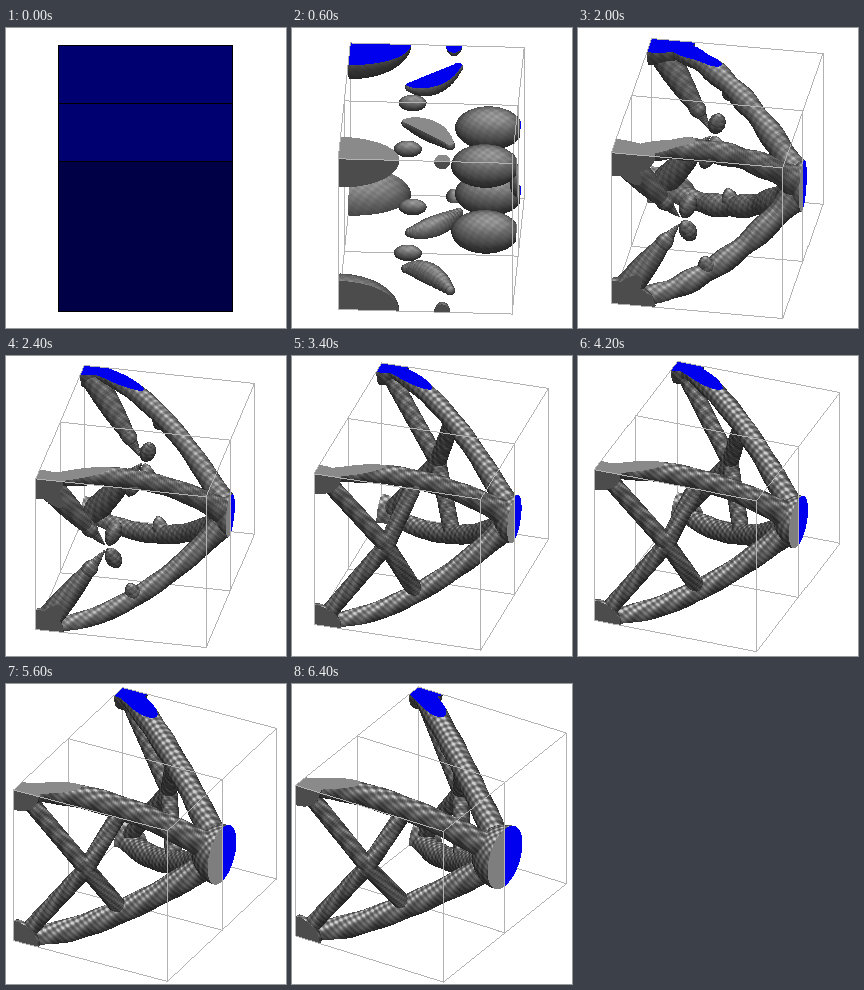
An HTML page with a canvas that plays this animation: 280 px wide and 300 px high, repeating every 6.6 s.

```html
<!DOCTYPE html>
<html lang="en">
<head>
<meta charset="utf-8">
<title>Bracket optimisation</title>
<style>
html, body { margin: 0; width: 100%; height: 100%; overflow: hidden; background: #fff; }
canvas { display: block; width: 280px; height: 300px; }
</style>
</head>
<body>
<canvas id="stage" width="280" height="300"></canvas>
<script>
const W = 280, H = 300, CX = 138.7, CY = 150, STEP = 200, STEPS = 33;
const ctx = document.getElementById('stage').getContext('2d');
const img = ctx.createImageData(W, H), px = img.data;
const zbuf = new Float32Array(W * H), enter = new Float32Array(W * H), leave = new Float32Array(W * H);
const side = new Uint8Array(W * H);

// Half sizes of the box; x runs along the beam, y up, z towards the viewer.
const BX = 87, BY = 87, BZ = 116, LEN = 2 * BX;

let step = -1, right, up, view, grain;

const dot = (a, b) => a[0] * b[0] + a[1] * b[1] + a[2] * b[2];
const mix = (a, b, t) => a + (b - a) * t;
const mixPoint = (a, b, t) => a.map((v, i) => mix(v, b[i], t));
const clamp = t => Math.min(1, Math.max(0, t));
function smooth(from, to, v) {
  const t = clamp((v - from) / (to - from));
  return t * t * (3 - 2 * t);
}

// The view turns one degree per step, seen from 30 degrees above.
function aim(deg) {
  const a = deg * Math.PI / 180, s = Math.sin(a), c = Math.cos(a), k = Math.sqrt(3) / 2;
  right = [c, 0, -s];
  up = [-s / 2, k, -c / 2];
  view = [s * k, .5, c * k];
}

function project(p) {
  const q = [p[0] - BX, p[1], p[2]];
  return [CX + dot(q, right), CY - dot(q, up), dot(q, view)];
}

const rayStart = (x, y, i) => (x - CX) * right[i] + (CY - y) * up[i];

// Where each pixel's ray enters and leaves the box, and through which face.
function clipBox() {
  const half = [BX, BY, BZ];
  for (let y = 0, n = 0; y < H; y++) for (let x = 0; x < W; x++, n++) {
    let near = 1e6, far = -1e6, face = 0;
    for (let i = 0; i < 3; i++) {
      const o = rayStart(x, y, i), v = view[i];
      if (v < 1e-6) {
        if (Math.abs(o) > half[i]) near = -1e6;
        continue;
      }
      const t = (half[i] - o) / v;
      if (t < near) { near = t; face = i; }
      far = Math.max(far, (-half[i] - o) / v);
    }
    enter[n] = near; leave[n] = far; side[n] = face;
  }
}

function put(n, r, g, b) {
  px[n * 4] = r; px[n * 4 + 1] = g; px[n * 4 + 2] = b;
}

// Cut faces are blue in the rear half and flat grey in the front half.
function cap(n, z) {
  const face = side[n];
  if (!step) put(n, 0, 0, face === 1 ? 112 : 70);
  else if (z < 0) put(n, 0, 0, 238);
  else { const g = [126, 138, 76][face]; put(n, g, g, g); }
}

function shade(n, x, y, z, nx, ny, nz) {
  const rough = grain * Math.sin(.7 * x + .4 * y) * Math.sin(.6 * z - .5 * y);
  const lit = Math.max(0, nx * .1 + ny * .93 + nz * .3 + rough);
  const face = Math.max(0, nx * view[0] + ny * view[1] + nz * view[2]);
  const g = Math.min(205, 34 + 24 * face + 52 * lit + 50 * lit ** 6 + 45 * rough);
  put(n, g, g, g);
}

function ellipsoid(c, rx, ry, rz) {
  if (Math.min(rx, ry, rz) < .8) return;
  const [sx, sy] = project(c), R = Math.max(rx, ry, rz);
  const x1 = Math.min(W - 1, Math.ceil(sx + R)), y1 = Math.min(H - 1, Math.ceil(sy + R));
  const wx = view[0] / rx, wy = view[1] / ry, wz = view[2] / rz, A = wx * wx + wy * wy + wz * wz;
  for (let y = Math.max(0, Math.floor(sy - R)); y <= y1; y++) {
    for (let x = Math.max(0, Math.floor(sx - R)); x <= x1; x++) {
      const n = y * W + x, near = enter[n], far = leave[n];
      if (near <= far) continue;
      const ox = rayStart(x, y, 0), oy = rayStart(x, y, 1), oz = rayStart(x, y, 2);
      const qx = (ox + BX - c[0]) / rx, qy = (oy - c[1]) / ry, qz = (oz - c[2]) / rz;
      const B = qx * wx + qy * wy + qz * wz, D = B * B - A * (qx * qx + qy * qy + qz * qz - 1);
      if (D < 0) continue;
      const root = Math.sqrt(D), front = (root - B) / A, back = (-root - B) / A;
      if (front < far || back > near) continue;
      const t = Math.min(front, near);
      if (t <= zbuf[n]) continue;
      zbuf[n] = t;
      if (front >= near) { cap(n, oz + t * view[2]); continue; }
      const nx = (qx + t * wx) / rx, ny = (qy + t * wy) / ry, nz = (qz + t * wz) / rz, l = Math.hypot(nx, ny, nz);
      shade(n, ox + t * view[0], oy + t * view[1], oz + t * view[2], nx / l, ny / l, nz / l);
    }
  }
}

// Only one quadrant is described; the rest is mirrored in y and z.
function blob(p, rx, ry = rx, rz = rx) {
  for (const sy of p[1] ? [1, -1] : [1])
    for (const sz of p[2] ? [1, -1] : [1])
      ellipsoid([p[0], p[1] * sy, p[2] * sz], rx, ry, rz);
}

function tube(count, path, radius) {
  for (let i = 0; i <= count; i++) blob(path(i / count), radius(i / count));
}

function structure(k) {
  const early = 1 - smooth(7, 12, k), late = smooth(15, 28, k), born = smooth(3, 6, k);
  const lumpy = smooth(3, 7, k) * early, swell = 1 + .4 * clamp((3 - k) / 2), loose = (1 - born) * swell;
  const age = clamp((k - 7) / 25);

  // Supports in the corners, the loaded disc at the far end.
  blob([0, BY, BZ], (28 + 33 * early + 14 * lumpy) * swell, (23 + 10 * early) * swell, (19 + 25 * early) * swell);
  const disc = 15 + .56 * k;
  blob([LEN, 0, 0], 6 + .85 * k, disc + 18 * lumpy, disc + 6 * lumpy);

  // Loose pieces that vanish once the bars connect.
  blob([143, 38, 38], 34 * loose, 21 * loose, 24 * loose);
  blob([104, BY, BZ], 8 * loose, 9 * loose, 14 * loose);
  blob([66, 60, 46], 14 * loose, 8 * loose, 9 * loose);
  tube(16, s => [mix(64, 110, s), 84, 36 + 42 * s * s], s => (5 + 7 * Math.sin(Math.PI * s)) * loose);

  // Bowed bars from the corners to the disc; they straighten with age.
  const bowY = mix(2.5, 1.6, age), bowZ = mix(1.3, .92, age);
  const chord = u => [LEN * u, BY * (1 - u ** bowY), BZ * (1 - u ** bowZ)];
  tube(90, chord, u => {
    const bead = 1 + (.03 + .17 * lumpy) * Math.sin(34 * u);
    return mix(-8, (9.5 + 4.5 * early + 2.5 * late + 5 * u ** 8) * bead, born);
  });

  // Cross braces grow from stubs and drops into a closed X.
  const root = [12, 76, 109], node = [67, 0, 88], end = chord(.52), bend = .62;
  const web = s => s < bend ? mixPoint(root, node, s / bend) : mixPoint(node, end, (s - bend) / (1 - bend));
  const closed = smooth(11, 17, k);
  tube(60, web, s => {
    const drops = Math.max(13 - 36 * s * s, 8 * Math.cos(23 * (s - .7))) * (1 + .25 * lumpy);
    return mix(-8, mix(drops, 8.5, closed), born);
  });
}

function wire(a, b) {
  const p = project(a), q = project(b), g = step ? 178 : 0;
  const n = Math.ceil(Math.max(Math.abs(q[0] - p[0]), Math.abs(q[1] - p[1]), 1));
  for (let i = 0; i <= n; i++) {
    const [x, y, z] = mixPoint(p, q, i / n).map((v, j) => j < 2 ? Math.round(v) : v);
    if (x < 0 || y < 0 || x >= W || y >= H) continue;
    const k = y * W + x;
    if (z > zbuf[k] - 2) put(k, g, g, g);
  }
}

// Both halves of the box share the middle plane.
function wires() {
  const X = [0, LEN], Y = [-BY, BY], Z = [-BZ, 0, BZ];
  for (const z of Z) {
    for (const y of Y) wire([X[0], y, z], [X[1], y, z]);
    for (const x of X) wire([x, Y[0], z], [x, Y[1], z]);
  }
  for (const x of X) for (const y of Y) wire([x, y, Z[0]], [x, y, Z[2]]);
}

function draw() {
  aim(step);
  clipBox();
  px.fill(255);
  zbuf.fill(-1e6);
  grain = Math.min(.24, step * .012);
  if (step) structure(step);
  else ellipsoid([BX, 0, 0], 900, 900, 900);
  wires();
  ctx.putImageData(img, 0, 0);
}

function tick() {
  const now = Math.floor(performance.now() / STEP) % STEPS;
  if (now !== step) {
    step = now;
    draw();
  }
  requestAnimationFrame(tick);
}
tick();
</script>
</body>
</html>
```
